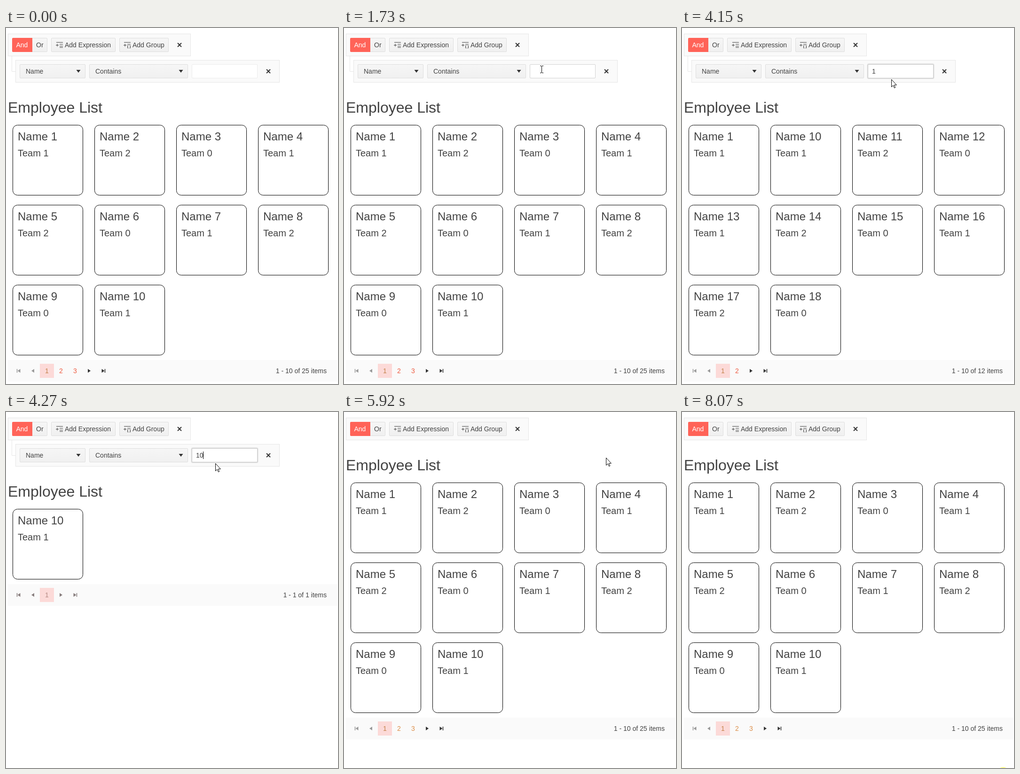
An HTML page that plays this animation: 706x757 px, repeating every 8150 ms.

```html
<!DOCTYPE html>
<html lang="en">
<head>
<meta charset="utf-8">
<title>Filtered list</title>
<style>
  html, body { margin: 0; width: 100%; height: 100%; overflow: hidden; background: #fff; }
  svg { display: block; width: 706px; height: 757px; }
  text { font: 14px "Liberation Sans", Arial, sans-serif; fill: #424242; white-space: pre; }
  .title { font-size: 32px; }
  .name { font-size: 24px; }
  .team { font-size: 20px; }
  .panel { fill: #fafafa; stroke: #e6e6e6; }
  .button { fill: url(#shade); stroke: #dedede; }
  .card { fill: #fff; stroke: #000; }
  .line { fill: none; stroke: #424242; }
  .cross { fill: none; stroke: #333; stroke-width: 2; }
</style>
</head>
<body>
<svg viewBox="0 0 706 757" xmlns="http://www.w3.org/2000/svg">
  <defs>
    <linearGradient id="shade" x2="0" y2="1">
      <stop stop-color="#f6f6f6"/><stop offset="1" stop-color="#f0f0f0"/>
    </linearGradient>
  </defs>
  <g id="toolbar"></g>
  <g id="expression"></g>
  <g id="list"></g>
  <circle id="highlight" cx="683" cy="768" r="13" fill="#ffff80"/>
  <path id="arrow" d="M.5 .5V16.3L4 13L6.6 18.5L8.7 17.6L6.3 12.2H11.3Z" fill="#fff" stroke="#000"/>
  <path id="beam" d="M-3 -7.5H-1L.5 -6.5L2 -7.5H4M.5 -6.5V6.5M-3 7.5H-1L.5 6.5L2 7.5H4" fill="none" stroke="#000"/>
</svg>
<script>
const LOOP = 8150;
const FOCUS = 1860, TYPE_ONE = 2280, TYPE_ZERO = 4270, REMOVED = 5920;
const BLINK = 530;

// Pointer paths; the points of each one are evenly spaced in time.
const moves = [
  { from: 780, to: 1580, points: [[627, 742], [567, 560], [480, 330], [425, 180], [407, 113]] },
  { from: 1580, to: 1730, points: [[407, 113], [414, 99], [420, 88]] },
  { from: 2780, to: 3600, points: [[420, 88], [450, 110], [466, 137], [470, 165], [461, 136], [447, 103]] },
  { from: 4040, to: 4150, points: [[447, 103], [445, 109]] },
  { from: 5060, to: 5780, points: [[445, 109], [487, 127], [523, 134], [548, 131], [556, 111], [557, 97]] },
  { from: 6400, to: 6410, points: [[557, 97], [553, 97]] },
  { from: 6600, to: 7770, points: [[553, 97], [541, 120], [513, 169], [475, 250], [455, 350],
    [474, 460], [535, 560], [602, 646], [643, 708], [669, 757]] }
];

const $ = id => document.getElementById(id);
const text = (x, y, value, extra = '') => `<text x="${x}" y="${y}" ${extra}>${value}</text>`;
const path = (d, extra = 'class="line"') => `<path d="${d}" ${extra}/>`;
const box = (x, y, w, h, extra) =>
  `<rect x="${x + .5}" y="${y + .5}" width="${w - 1}" height="${h - 1}" ${extra}/>`;
const cross = (x, y) => path(`M${x - 4} ${y - 4}l8 8m0 -8l-8 8`, 'class="cross"');
const button = (x, y, w, label, textX) =>
  box(x, y, w, 30, 'rx="1.5" class="button"') + text(textX, y + 20, label);
const dropdown = (x, w, label) => button(x, 77, w, label, x + 13) +
  path(`M${x + w - 19.5} 89h9l-4.5 6z`, 'fill="#333"');

const plusIcon = x => path(`M${x + 1} 30.5h14M${x} 36.5h6M${x + 3} 33.5v6M${x + 8} 34.5h7`);

function drawToolbar() {
  return box(4, 12, 389, 48, 'class="panel"') +
    button(55, 21, 33, 'Or', 64) +
    path('M56 21v30H15a2 2 0 0 1-2-2V23a2 2 0 0 1 2-2z', 'fill="#ff6358"') +
    text(21.5, 41, 'And', 'style="fill:#fff"') +
    button(96, 21, 137, 'Add Expression', 125) +
    plusIcon(106) + path('M114 38.5h7M114 41.5h7') +
    button(241, 21, 105, 'Add Group', 269) +
    plusIcon(250) + path('M260.5 37.5h-2v5h2M262.5 37.5h2v5h-2') +
    cross(369, 36);
}

function drawExpression({ value, hover, focus, caret }) {
  const edge = focus ? '#c8c8c8' : hover ? '#d2d2d2' : '#ebebeb';
  const caretX = Math.round(404 + value.length * 7.8) - .5;
  return path('M12.5 60V92.5H20', 'fill="none" stroke="#e6e6e6"') +
    box(20, 68, 562, 48, 'class="panel"') +
    dropdown(29, 140, 'Name') + dropdown(177, 210, 'Contains') +
    (focus ? box(394, 76, 142, 32, 'rx="2.5" fill="none" stroke="#e0e0e0" stroke-width="2"') : '') +
    box(395, 77, 140, 30, `rx="1.5" fill="#fff" stroke="${edge}"`) +
    text(404, 97, value) +
    (caret ? path(`M${caretX} 84v16`, 'stroke="#000"') : '') +
    cross(558, 92);
}

function drawPager(y, pages, total, late) {
  const only = pages === 1;
  const idle = only ? '#877d7d' : '#999';
  const live = only ? idle : '#333';
  const linkColor = late ? '#dc8d48' : '#ee5a40';
  const mid = y + 23;
  const triangle = (x, dir, color) => path(`M${x} ${mid}l${6 * dir} -4v8z`, `fill="${color}"`);
  const bar = (x, color) => path(`M${x} ${mid - 4}v8`, `stroke="${color}" stroke-width="1.5"`);
  const next = 87 + 30 * pages;
  let out = `<rect x="4" y="${y}" width="700" height="46" fill="#fafafa"/>` +
    `<rect x="72" y="${y + 8}" width="30" height="30" fill="#fcdad8"/>` +
    bar(23.5, idle) + triangle(24.5, 1, idle) + triangle(54, 1, idle) +
    triangle(next + 3, -1, live) + triangle(next + 32.5, -1, live) + bar(next + 33.5, live);
  for (let page = 1; page <= pages; page++) {
    const color = page > 1 ? linkColor : only ? '#b58a84' : '#c38148';
    out += text(57 + 30 * page, y + 28, page, `text-anchor="middle" style="fill:${color}"`);
  }
  return out + text(682, y + 28, `1 - ${Math.min(10, total)} of ${total} items`, 'text-anchor="end"');
}

function drawList(value, removed) {
  const shift = removed ? -56 : 0;
  const found = Array.from({ length: 25 }, (_, i) => i + 1).filter(n => String(n).includes(value));
  const shown = found.slice(0, 10);
  const cards = shown.map((n, i) => {
    const x = 14 + i % 4 * 174, y = 206 + shift + Math.floor(i / 4) * 170;
    return box(x, y, 150, 150, 'rx="10" class="card"') +
      text(x + 11, y + 33, `Name ${n}`, 'class="name"') +
      text(x + 11, y + 67, `Team ${n % 3}`, 'class="team"');
  });
  const pagerY = 196 + shift + Math.ceil(shown.length / 4) * 170;
  return text(4, 180 + shift, 'Employee List', 'class="title"') + cards.join('') +
    drawPager(pagerY, Math.ceil(found.length / 10), found.length, removed);
}

// Catmull-Rom curve through the points, with u from 0 to 1.
function along(points, u) {
  const s = u * (points.length - 1);
  const i = Math.min(Math.floor(s), points.length - 2), f = s - i;
  const at = k => points[Math.max(0, Math.min(points.length - 1, k))];
  return [0, 1].map(axis => {
    const [a, b, c, d] = [-1, 0, 1, 2].map(k => at(i + k)[axis]);
    return b + f / 2 * (c - a + f * (2 * a - 5 * b + 4 * c - d + f * (3 * (b - c) + d - a)));
  });
}

function pointerAt(t) {
  const move = moves.filter(m => m.from <= t).pop();
  if (!move || t >= 7760) return null;
  return along(move.points, Math.min(1, (t - move.from) / (move.to - move.from)));
}

const drawn = {};
function put(id, key, draw) {
  if (drawn[id] === key) return;
  drawn[id] = key;
  $(id).innerHTML = draw();
}

function place(id, visible, pos) {
  $(id).style.display = visible ? '' : 'none';
  if (visible) $(id).setAttribute('transform', `translate(${pos.map(Math.round)})`);
}

function render(t) {
  const removed = t >= REMOVED;
  const value = removed || t < TYPE_ONE ? '' : t < TYPE_ZERO ? '1' : '10';
  const pos = pointerAt(t);
  const over = !!pos && !removed && pos[0] > 395 && pos[0] < 535 && pos[1] > 77 && pos[1] < 107;
  const focus = t >= FOCUS;
  const lastKey = [TYPE_ZERO, TYPE_ONE, FOCUS].find(start => start <= t);
  const caret = focus && Math.floor((t - lastKey + 25) / BLINK) % 2 === 0;
  const state = { value, hover: over, focus, caret };

  put('expression', JSON.stringify([removed, state]), () => removed ? '' : drawExpression(state));
  put('list', value + removed, () => drawList(value, removed));
  place('arrow', pos && !over, pos);
  place('beam', over, pos);
  $('highlight').style.display = t >= 8070 ? '' : 'none';
}

$('toolbar').innerHTML = drawToolbar();
const start = performance.now();
function tick() {
  render((performance.now() - start) % LOOP);
  requestAnimationFrame(tick);
}
tick();
</script>
</body>
</html>
```
